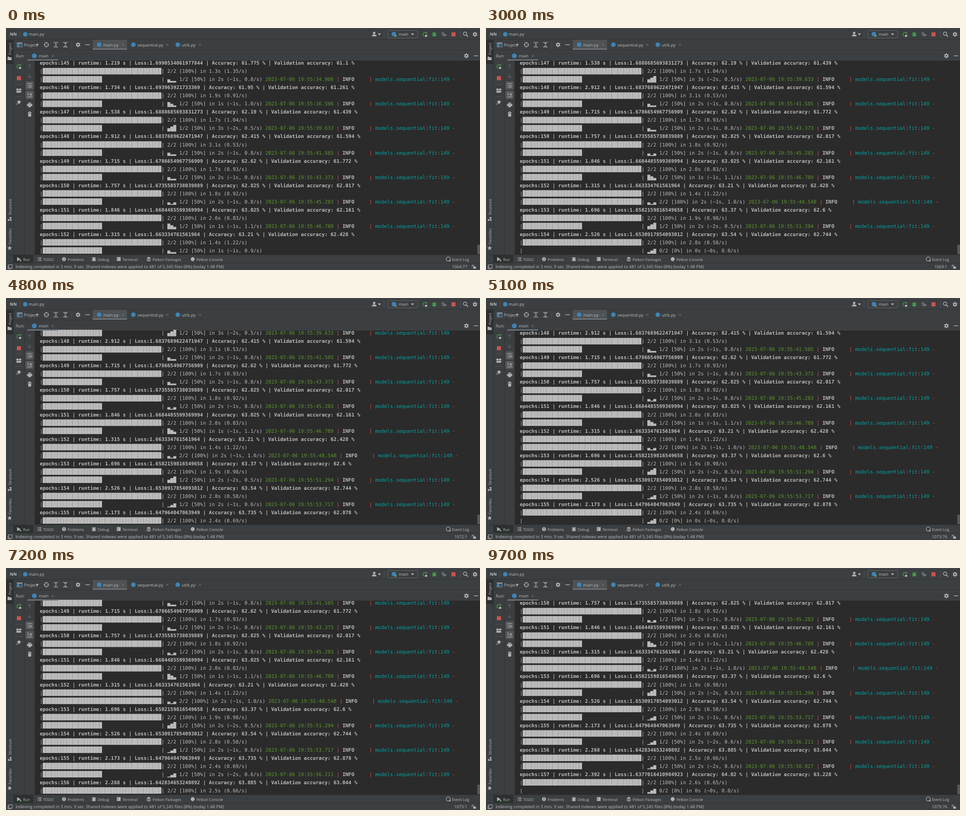
Write an HTML page with a canvas that moves like this. It is 1046 by 535 pixels and loops after 9800 ms.

```html
<!DOCTYPE html>
<html lang="en">
<head>
<meta charset="utf-8">
<title>Training run</title>
<style>
html, body { margin: 0; width: 100%; height: 100%; overflow: hidden; background: #3c3f41; }
canvas { display: block; width: 1046px; height: 535px; }
</style>
</head>
<body>
<canvas id="stage"></canvas>
<script>
const W = 1046, H = 535, LOOP = 9800, FIRST = 145;
const X0 = 74.4, ADV = 6.55, Y0 = 81.3, LH = 18.02;
const UI = '"Open Sans", "Noto Sans", sans-serif';
const MONO = '"DejaVu Sans Mono", "Noto Sans Mono", monospace';
const PANEL = '#3c3f41', DARK = '#2b2b2b', LINE = '#323232', FG = '#bbbbbb', ICON = '#afb1b3';
const DIM = '#606365', GREEN = '#499c54', RED = '#c75450', BLUE = '#3d84b8';

const canvas = document.getElementById('stage');
const g = canvas.getContext('2d');
const dpr = window.devicePixelRatio || 1;
canvas.width = W * dpr;
canvas.height = H * dpr;

// runtime, loss, accuracy, validation ; total ; wave phase ; progress text ; log time
const epochs = [
  '1.219 1.6990534061977844 61.775 61.1;1.3s (1.35/s);11;2s (~1s, 0.8/s);34.900',
  '1.734 1.693963921733369 61.95 61.261;1.9s (0.91/s);9;1s (~1s, 1.0/s);36.596',
  '1.538 1.6888685693831273 62.19 61.439;1.7s (1.04/s);3;3s (~2s, 0.5/s);39.633',
  '2.912 1.6837689622471947 62.415 61.594;3.1s (0.53/s);11;2s (~1s, 0.8/s);41.585',
  '1.715 1.6786654967756909 62.62 61.772;1.7s (0.93/s);11;2s (~1s, 0.8/s);43.373',
  '1.757 1.6735585738039889 62.825 62.017;1.8s (0.92/s);12;2s (~1s, 0.8/s);45.283',
  '1.846 1.6684485599369994 63.025 62.161;2.0s (0.83/s);8;1s (~1s, 1.1/s);46.789',
  '1.315 1.663334761561964 63.21 62.428;1.4s (1.22/s);12;2s (~1s, 1.0/s);48.548',
  '1.696 1.6582159816549658 63.37 62.6;1.9s (0.98/s);3;2s (~2s, 0.5/s);51.294',
  '2.526 1.6530917854093012 63.54 62.744;2.8s (0.58/s);0;2s (~1s, 0.6/s);53.717',
  '2.173 1.647964047063949 63.735 62.878;2.4s (0.69/s);0;2s (~2s, 0.6/s);56.211',
  '2.268 1.642834653240892 63.885 63.044;2.5s (0.66/s);0;2s (~2s, 0.6/s);58.827',
  '2.392 1.6377016410904923 64.02 63.228;2.6s (0.65/s);0;;'
].map((row, i) => {
  const [stats, total, phase, info, time] = row.split(';');
  return { n: FIRST + i, stats: stats.split(' '), total, phase: +phase, info, time };
});
epochs.find(e => e.n === 152).done = 2;

// part: first two new rows; full: third row; half: 1/2 reached; caret: status bar updates
const runs = [
  { n: 152, part: 0, full: 0, half: 0, end: 100, lag: 0.17, caret: [0, 0], steps: [[0, 11], [100, 12]] },
  { n: 153, part: 300, full: 400, half: 1800, caret: [600, 1900],
    steps: [[400, 1], [600, 2], [800, 4], [1000, 5], [1200, 7], [1300, 8], [1400, 10], [1500, 11],
            [1800, 12], [1900, 13], [2100, 14], [2200, 15], [2500, 16]] },
  { n: 154, part: 2800, full: 3000, half: 3900, caret: [3200, 4000],
    steps: [[3000, 1], [3200, 3], [3500, 5], [3900, 8], [4000, 9], [4200, 10], [4300, 11], [4500, 13]] },
  { n: 155, part: 4800, full: 4900, half: 5900, caret: [5100, 6000],
    steps: [[4900, 0], [5100, 1], [5400, 4], [5500, 5], [5900, 8], [6000, 9], [6200, 10], [6400, 11], [6700, 12], [6800, 13]] },
  { n: 156, part: 7200, full: 7500, half: 8200, caret: [7600, 8300],
    steps: [[7500, 2], [7600, 3], [7800, 4], [8200, 8], [8300, 9], [8600, 11], [8700, 12], [8800, 13.5], [9100, 14]] },
  { n: 157, part: 9400, full: 9400, half: LOOP, caret: [9700, LOOP], steps: [[9400, 1]] }
];

const last = (list, test) => list.filter(test).pop();

function stateAt(t) {
  const run = last(runs, r => r.part <= t);
  const step = last(run.steps, s => s[0] <= t);
  const phase = step ? step[1] : 0;
  const done = t >= run.end ? 2 : t >= run.half ? 1 : 0;
  const spent = phase * 0.116 - (run.lag || 0);
  const eta = done ? Math.round(spent - 0.06) : 0;
  const rate = done ? (1 / spent).toFixed(1) : '0.0';
  const row = 1064 + 3 * (run.n - 152);
  const caret = t < run.caret[0] ? `${row - 1}:1` : `${row}:${t < run.caret[1] ? 76 : 77}`;
  const info = done === 2 ? epochs[run.n - FIRST].info : `${Math.round(spent)}s (~${eta}s, ${rate}/s)`;
  return { n: run.n, full: t >= run.full, phase: Math.floor(phase), done, info, caret };
}

// ---- drawing helpers ----
function rect(x, y, w, h, color) { g.fillStyle = color; g.fillRect(x, y, w, h); }

function disc(x, y, r, color) {
  g.fillStyle = color;
  g.beginPath();
  g.arc(x, y, r, 0, 7);
  g.fill();
}

function ring(x, y, r, color = ICON, w = 1.2, from = 0, to = Math.PI * 2) {
  g.strokeStyle = color;
  g.lineWidth = w;
  g.beginPath();
  g.arc(x, y, r, from, to);
  g.stroke();
}

function trace(pts) {
  g.beginPath();
  for (let i = 0; i < pts.length; i += 2) g.lineTo(pts[i], pts[i + 1]);
}

function line(pts, color = ICON, w = 1.2) {
  g.strokeStyle = color;
  g.lineWidth = w;
  trace(pts);
  g.stroke();
}

function poly(pts, color = ICON) {
  g.fillStyle = color;
  trace(pts);
  g.fill();
}

function box(x, y, w, h, color = ICON, lw = 1.2) {
  g.strokeStyle = color;
  g.lineWidth = lw;
  g.strokeRect(x, y, w, h);
}

function round(x, y, w, h, r, color) {
  g.beginPath();
  g.roundRect(x, y, w, h, r);
  g.fillStyle = color;
  g.fill();
}

function label(s, x, y, size = 9.3, color = FG, weight = 400) {
  g.font = `${weight} ${size}px ${UI}`;
  g.fillStyle = color;
  g.fillText(s, x, y);
}

function sideLabel(s, x, y) {
  g.save();
  g.translate(x, y);
  g.rotate(-Math.PI / 2);
  label(s, 0, 0, 8.2);
  g.restore();
}

// ---- icons ----
const caretDown = (x, y) => poly([x - 3.5, y - 2, x + 3.5, y - 2, x, y + 2.2]);
const minus = (x, y) => rect(x - 5, y - 0.7, 10, 1.4, ICON);

function cross(x, y) {
  line([x - 2.5, y - 2.5, x + 2.5, y + 2.5], '#787b7d', 0.9);
  line([x - 2.5, y + 2.5, x + 2.5, y - 2.5], '#787b7d', 0.9);
}

function gear(x, y) {
  ring(x, y, 2.9, ICON, 2.2);
  for (let i = 0; i < 6; i++) {
    const a = i * Math.PI / 3 + Math.PI / 6, c = Math.cos(a), s = Math.sin(a);
    line([x + c * 3, y + s * 3, x + c * 5.2, y + s * 5.2], ICON, 2.2);
  }
}

function rerun(x, y) {
  ring(x, y, 3.9, GREEN, 1.5, 0.8, 5.4);
  poly([x + 1, y - 2, x + 5.2, y - 2, x + 5.2, y - 6], GREEN);
  rect(x + 1, y + 1, 4.4, 4.4, ICON);
}

function bug(x, y, color) {
  g.fillStyle = color;
  g.beginPath();
  g.ellipse(x, y + 0.5, 3, 4.3, 0, 0, 7);
  g.fill();
  for (const d of [-2.6, 0.6, 3.4]) line([x - 5, y + d, x + 5, y + d], color, 1.1);
  line([x - 3, y - 5, x, y - 2, x + 3, y - 5], color, 1);
}

function arrow(x, y, dir) {
  line([x, y - 4.5 * dir, x, y + 4.5 * dir], DIM, 1.2);
  line([x - 3.5, y + dir, x, y + 4.5 * dir, x + 3.5, y + dir], DIM, 1.2);
}

function fold(x, y, dir) {
  rect(x - 5, y - 5.6, 10, 1.3, ICON);
  rect(x - 5, y + 4.4, 10, 1.3, ICON);
  for (const s of [-1, 1]) {
    const tip = y + s * (dir > 0 ? 3.6 : 0.6), base = y + s * (dir > 0 ? 1 : 3.4);
    poly([x - 2.8, base, x + 2.8, base, x, tip]);
  }
}

function star(x, y, r) {
  const pts = [];
  for (let i = 0; i < 10; i++) {
    const a = i * Math.PI / 5 - Math.PI / 2, d = i % 2 ? r * 0.42 : r;
    pts.push(x + d * Math.cos(a), y + d * Math.sin(a));
  }
  poly(pts);
}

// ---- window parts ----
function topBar() {
  rect(0, 0, W, 1, '#4a4d4f');
  rect(0, 25, W, 1, LINE);
  label('NN', 8.6, 17.4, 9.3, FG, 700);
  line([28.5, 8, 31.5, 14, 28.5, 20], DIM, 0.9);
  disc(42.5, 14, 5, BLUE);
  label('main.py', 50, 17.4);

  disc(812.5, 11, 2.7, ICON);
  poly([807, 18.5, 808.5, 15.2, 812.5, 14, 816.5, 15.2, 818, 18.5]);
  caretDown(824, 14);
  rect(834, 5, 1, 17, '#515456');
  g.beginPath();
  g.roundRect(842.5, 5.5, 66, 16.5, 3);
  g.strokeStyle = '#646769';
  g.lineWidth = 1;
  g.stroke();
  disc(856, 13.5, 5, BLUE);
  disc(860, 17.4, 2, '#5fb865');
  label('main', 866.5, 17.2, 9.1);
  caretDown(897, 14);
  rerun(924, 14);
  bug(945, 14, GREEN);
  poly([961, 9, 967, 9, 967, 13, 970, 15, 966, 19, 961, 15], DIM);
  poly([967, 12, 973, 15.5, 967, 19], '#75787a');
  rect(983, 9.5, 9, 9, RED);
  rect(1002, 5, 1, 17, '#515456');
  ring(1013, 12.6, 3.7, ICON, 1.5);
  line([1015.7, 15.4, 1019.5, 19.2], ICON, 1.8);
  gear(1035, 14);
}

function tabRow() {
  rect(24, 32, 12, 10.5, '#87939a');
  rect(25, 35, 10, 6.5, '#32506a');
  rect(26, 36.2, 3.4, 4.2, '#3f9ac9');
  label('Project', 39.6, 40.5);
  caretDown(69, 37.3);
  ring(89, 37, 4.8);
  for (const [dx, dy] of [[1, 0], [-1, 0], [0, 1], [0, -1]])
    line([89 + dx * 1.8, 37 + dy * 1.8, 89 + dx * 5.4, 37 + dy * 5.4], ICON, 1.3);
  fold(110, 37, 1);
  fold(131, 37, -1);
  rect(145, 28, 1, 18, '#515456');
  gear(159, 37);
  minus(180, 37);
  rect(190, 26, 1, 22, LINE);
  rect(191, 26, 76, 22, '#4e5254');
  rect(191, 45.5, 76, 2.5, '#747a80');
  for (const [name, x, end] of [['main.py', 205.5, 258], ['sequential.py', 281, 356], ['utils.py', 379, 428]]) {
    disc(x, 37, 5, BLUE);
    label(name, x + 9, 40.5, 9.2);
    cross(end, 37);
  }
  rect(0, 48, W, 1, LINE);
}

function runHeader() {
  label('Run:', 21.8, 65, 9.1);
  disc(62.5, 61.5, 5.3, BLUE);
  label('main', 72.5, 65, 9.1);
  cross(103, 62);
  rect(47, 69.5, 68, 2.5, '#747a80');
  gear(1016, 61.5);
  minus(1037, 61.5);
}

function leftTools() {
  rect(0, 26, 16, 54, '#2d2f30');
  sideLabel('Project', 12, 59.3);
  poly([3.5, 63.5, 7, 63.5, 8.3, 65, 12.5, 65, 12.5, 71, 3.5, 71]);
  sideLabel('Structure', 12, 413.3);
  for (const [x, y] of [[8.3, 418], [4, 422.6], [8.6, 422.6]]) rect(x, y, 3.6, 3.6, ICON);
  sideLabel('Favorites', 12, 478.3);
  star(8, 486.5, 5.5);
  rect(16, 26, 1, 494, LINE);
  rect(40, 72, 1, 430, LINE);
  rect(63, 72, 1, 430, LINE);

  rerun(28, 85);
  rect(24, 106.5, 9, 9, RED);
  rect(20, 124, 17, 1, '#515456');
  rect(23, 134, 5, 4, ICON);
  rect(29, 134, 4.5, 4, ICON);
  rect(23, 139, 10.5, 4, ICON);
  rect(20, 151, 17, 1, '#515456');
  poly([28.5, 159, 33.5, 164, 31.5, 164.5, 29.5, 168.5, 24, 163, 28, 161]);
  line([26.5, 166, 23, 169.5], ICON, 1.2);

  arrow(52, 85, -1);
  arrow(52, 106, 1);
  round(43, 118, 18, 18, 3, '#55595b');
  round(43, 139, 18, 18, 3, '#55595b');
  rect(47, 122.5, 10, 1.2, ICON);
  line([47, 127, 55.5, 127, 57, 128.5, 55.5, 130.5, 52.5, 130.5], ICON, 1.2);
  poly([53.5, 128, 53.5, 133, 50.5, 130.5]);
  rect(47, 130, 2.6, 1.2, ICON);
  rect(47, 143.5, 4.5, 1.2, ICON);
  rect(47, 147, 4.5, 1.2, ICON);
  rect(47, 151.7, 10.5, 1.3, ICON);
  line([55, 143, 55, 147], ICON, 1.3);
  poly([52.2, 146.5, 57.8, 146.5, 55, 150]);
  rect(49, 165, 6.5, 2.2, ICON);
  rect(46.5, 168, 11.5, 4.5, ICON);
  rect(49.5, 171.2, 5.5, 4, ICON);
  rect(48, 186, 8.5, 1.5, ICON);
  rect(50.5, 184.8, 3.5, 1.2, ICON);
  poly([48.7, 188.5, 55.8, 188.5, 55.2, 196, 49.3, 196]);
}

function bottomBars(caret) {
  rect(0, 501, W, 1, LINE);
  rect(17, 502, 43, 18, '#2d2f30');
  poly([24.5, 506.5, 32.5, 511, 24.5, 515.5]);
  disc(32, 514.5, 1.9, '#5fb865');
  for (const y of [507, 510.2, 513.4]) {
    rect(69.5, y, 1.6, 1.4, ICON);
    rect(72.2, y, 6, 1.4, ICON);
  }
  disc(128, 511, 4.4, ICON);
  rect(127.4, 508.3, 1.3, 3.3, PANEL);
  rect(127.4, 512.4, 1.3, 1.3, PANEL);
  bug(194, 511, ICON);
  rect(244.5, 506.5, 8.5, 8.5, ICON);
  line([246, 508.5, 248, 510.3, 246, 512], PANEL, 0.9);
  poly([310.5, 508.5, 315, 506, 319.5, 508.5, 315, 511]);
  line([310.5, 511, 315, 513.3, 319.5, 511], ICON, 1.2);
  line([310.5, 513.4, 315, 515.8, 319.5, 513.4], ICON, 1.2);
  disc(412, 511, 4.4, ICON);
  const tabs = [['Run', 37.7], ['TODO', 82], ['Problems', 136], ['Debug', 202.5], ['Terminal', 257],
    ['Pelkon Packages', 323.6], ['Pelkon Console', 420.4]];
  for (const [name, x] of tabs) label(name, x, 514.7, 8.2);
  ring(976, 510.8, 4.6, ICON, 1.2);
  poly([976.5, 514.5, 981, 511.5, 981, 516]);
  label('Event Log', 984.2, 514.7, 8.4);

  rect(0, 519, W, 1, LINE);
  box(6, 523.3, 7.6, 7.6, ICON, 1);
  line([4.4, 525, 4.4, 532.4, 12, 532.4], ICON, 1);
  label('Indexing completed in 3 min, 9 sec. Shared indexes were applied to 481 of 5,345 files (8%) (today 1:48 PM)', 21, 530.9, 9.385);
  g.textAlign = 'right';
  label(caret, 1018, 530.9, 9.2);
  g.textAlign = 'left';
  rect(1031, 527.3, 6, 4.8, ICON);
  ring(1030.3, 526, 1.9, ICON, 1.1, Math.PI, Math.PI * 2);
  line([1032.2, 526, 1032.2, 528], ICON, 1.1);
  line([1028.4, 526, 1028.4, 528], ICON, 1.1);
}

// ---- console ----
function put(row, col, s, color = FG, bold = false) {
  g.font = `${bold ? 700 : 400} 10.88px ${MONO}`;
  g.fillStyle = color;
  const y = Y0 + LH * row;
  for (let i = 0; i < s.length; i++)
    if (s[i] !== ' ') g.fillText(s[i], X0 + ADV * (col + i), y);
  return col + s.length;
}

function block(row, col, eighths) {
  const h = 14.4 * eighths / 8;
  rect(X0 + ADV * col, Y0 + LH * row + 3.3 - h, ADV, h, FG);
}

function meter(row, done) {
  put(row, 0, '|');
  for (let i = 1; i <= done * 20; i++) block(row, i, 8);
  put(row, 41, '|');
}

const wave = k => (k %= 14) < 8 ? k + 1 : 15 - k;

function progress(row, done, phase, info) {
  meter(row, done);
  for (let i = 0; i < 3; i++) block(row, 43 + i, wave(phase + 2 * i));
  return put(row, 47, `${done}/2 [${done * 50}%] in ${info}`);
}

function logTail(row, col, time) {
  const red = '#e0504e', cyan = '#00a3a3';
  col = put(row, col + 1, `2023-07-06 19:55:${time}`, '#5c962c');
  put(row, col + 1, '|', red);
  put(row, col + 3, 'INFO', FG, true);
  put(row, col + 12, '|', red);
  col = put(row, col + 14, 'models.sequential', cyan);
  col = put(row, col, ':', red);
  col = put(row, col, 'fit', cyan);
  col = put(row, col, ':', red);
  col = put(row, col, '149', cyan);
  put(row, col + 1, '-', red);
}

function consoleView(s) {
  rect(64, 72, W - 64, 429, DARK);
  rect(1040, 479, 6, 21, '#55585a');
  const end = (s.n - FIRST) * 3 + (s.full ? 2 : 1);
  for (let row = 0; row < 24; row++) {
    const i = end - 23 + row, e = epochs[Math.floor(i / 3)], kind = i % 3;
    if (kind === 0) {
      const [time, loss, acc, val] = e.stats;
      put(row, 0, `epochs:${e.n} | runtime: ${time} s | Loss:${loss} | Accuracy: ${acc} % | Validation accuracy: ${val} %`, FG, true);
    } else if (kind === 1) {
      meter(row, 2);
      put(row, 43, `2/2 [100%] in ${e.total}`);
    } else if (e.n === s.n) {
      progress(row, s.done, s.phase, s.info);
    } else {
      logTail(row, progress(row, e.done || 1, e.phase, e.info), e.time);
    }
  }
}

function draw(s) {
  g.setTransform(dpr, 0, 0, dpr, 0, 0);
  g.textRendering = 'geometricPrecision';
  rect(0, 0, W, H, PANEL);
  consoleView(s);
  topBar();
  tabRow();
  runHeader();
  leftTools();
  bottomBars(s.caret);
}

let shown = '';
function tick() {
  const s = stateAt(performance.now() % LOOP), key = JSON.stringify(s);
  if (key !== shown) {
    shown = key;
    draw(s);
  }
  requestAnimationFrame(tick);
}
tick();
</script>
</body>
</html>
```
